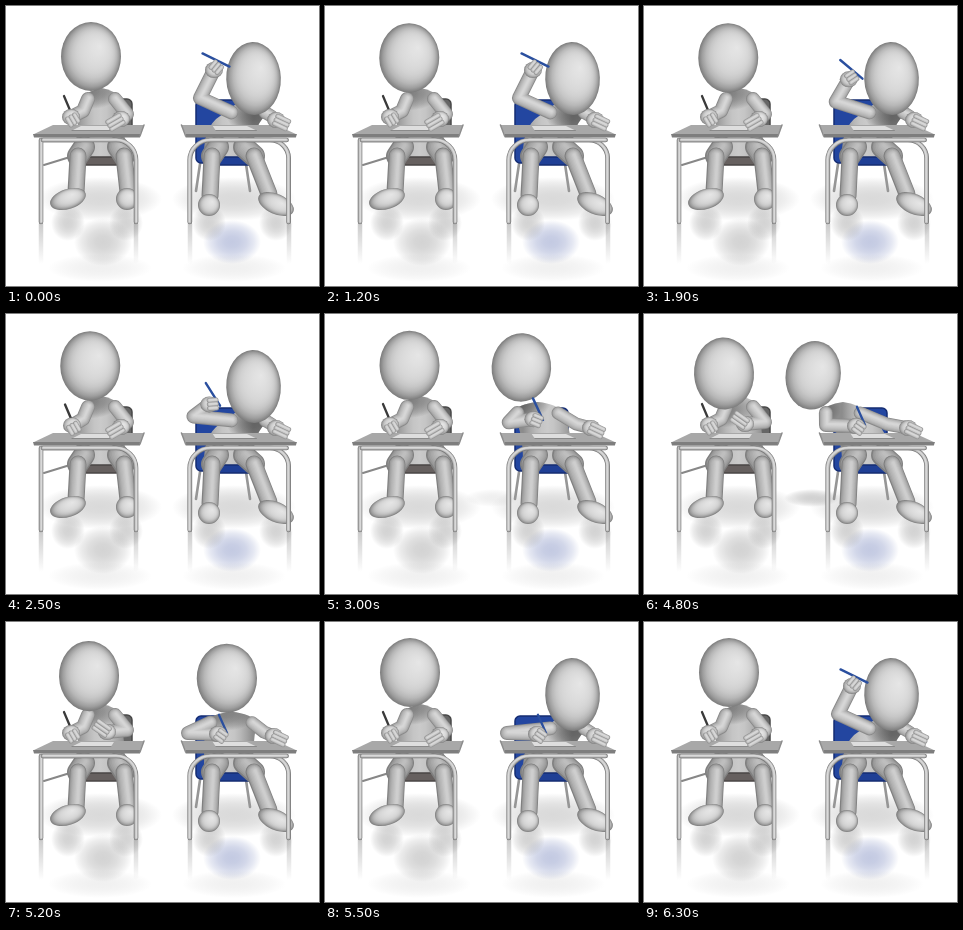
An HTML page with a canvas that plays this animation: 313x280 px, repeating every 6400 ms.

```html
<!DOCTYPE html>
<html lang="en">
<head>
<meta charset="utf-8">
<title>Two students at their desks</title>
<style>
html, body { margin: 0; width: 100%; height: 100%; overflow: hidden; background: #fff; }
canvas { display: block; width: 313px; height: 280px; }
</style>
</head>
<body>
<canvas id="stage"></canvas>
<script>
const W = 313, H = 280, LOOP = 6400, STEP = 100;
const canvas = document.getElementById('stage');
const ctx = canvas.getContext('2d');
const ratio = window.devicePixelRatio || 1;
canvas.width = W * ratio;
canvas.height = H * ratio;

const { sin, cos, PI, abs, sqrt } = Math;
const rad = deg => deg * PI / 180;
const mix = (a, b, u) => a + (b - a) * u;
const grey = v => `rgb(${v | 0},${v | 0},${v | 0})`;

// Eased 0 to 1 between two times
function ramp(t, from, to) {
  const u = Math.min(1, Math.max(0, (t - from) / (to - from)));
  return u * u * (3 - 2 * u);
}

// Short writing strokes inside a time window
const scribble = (t, from, to) => t > from && t < to ? sin(t / 200 * PI) : 0;

// ---- drawing helpers ----
function tube(pts, w, lo = 138, hi = 214, bend = 0) {
  const layers = w > 8 ? 8 : 4;
  for (let i = 0; i < layers; i++) {
    const u = i / (layers - 1), o = w * 0.08 * u;
    const at = k => [pts[k][0] + o, pts[k][1] - o];
    const last = pts.length - 1;
    ctx.beginPath();
    ctx.moveTo(...at(0));
    for (let k = 1; k < last; k++) ctx.arcTo(...at(k), ...at(k + 1), bend);
    ctx.lineTo(...at(last));
    ctx.lineWidth = w * (1 - 0.85 * u);
    ctx.strokeStyle = grey(mix(lo, hi, sqrt(u)));
    ctx.stroke();
  }
}

function line(x0, y0, x1, y1, w, color) {
  ctx.beginPath();
  ctx.moveTo(x0, y0);
  ctx.lineTo(x1, y1);
  ctx.lineWidth = w;
  ctx.strokeStyle = color;
  ctx.stroke();
}

// Slab seen from the front: back edge x0..x1, front edge x2..x3
function slab(x0, x1, x2, x3, top, bottom, fill) {
  ctx.beginPath();
  ctx.moveTo(x0, top);
  ctx.lineTo(x1, top);
  ctx.lineTo(x3, bottom);
  ctx.lineTo(x2, bottom);
  ctx.fillStyle = fill;
  ctx.fill();
}

function oval(x, y, rx, ry, deg, paint) {
  ctx.save();
  ctx.translate(x, y);
  ctx.rotate(rad(deg));
  ctx.scale(rx, ry);
  ctx.beginPath();
  ctx.arc(0, 0, 1, 0, 2 * PI);
  ctx.fillStyle = paint;
  ctx.fill();
  ctx.restore();
}

// Soft sphere shading, lit from the upper right
const skin = ctx.createRadialGradient(0.3, -0.3, 0, 0, 0, 1);
for (let u = 0; u <= 1; u += 0.1) skin.addColorStop(u, grey(230 - 24 * u - 84 * u ** 5));
const ball = (x, y, rx, ry, deg = 0) => oval(x, y, rx, ry, deg, skin);

function blob(x, y, rx, ry, alpha, rgb = '110,110,110') {
  const g = ctx.createRadialGradient(0, 0, 0, 0, 0, 1);
  for (let u = 0; u <= 1; u += 0.25) g.addColorStop(u, `rgba(${rgb},${alpha * (1 - u * u)})`);
  oval(x, y, rx, ry, 0, g);
}

function pad(x, y, w, h, fill, edge) {
  ctx.beginPath();
  ctx.roundRect(x, y, w, h, 5);
  ctx.fillStyle = fill;
  ctx.fill();
  ctx.lineWidth = 1.5;
  ctx.strokeStyle = edge;
  ctx.stroke();
}

// ---- figure ----
function torso([ax, ay], [bx, by], x0, x1, head) {
  const mid = (ax + bx) / 2, base = 147;
  const g = ctx.createLinearGradient(x0, 0, x1, 0);
  for (let u = 0; u <= 1; u += 0.125) g.addColorStop(u, grey(140 + 62 * sin(PI * u)));
  ctx.save();
  ctx.beginPath();
  ctx.moveTo(ax - 5, ay);
  ctx.quadraticCurveTo(ax, ay - 9, mid, ay - 11);
  ctx.quadraticCurveTo(bx, by - 9, bx + 5, by);
  ctx.quadraticCurveTo(x1, 116, x1, base);
  ctx.quadraticCurveTo((x0 + x1) / 2, base + 11, x0, base);
  ctx.quadraticCurveTo(x0, 116, ax - 5, ay);
  ctx.fillStyle = g;
  ctx.fill();
  ctx.clip();
  blob(head.x, head.y + head.ry, head.rx, 18, 0.5, '60,60,60');
  ctx.restore();
}

function hand([x, y], deg, reach) {
  ball(x, y, 9, 8);
  const c = cos(rad(deg)), s = sin(rad(deg));
  for (const k of [-4, 0, 4]) {
    const px = x - s * k, py = y + c * k;
    tube([[px, py], [px + c * reach, py + s * reach]], 5, 150, 222);
  }
}

function leg(hip, knee, ankle) {
  tube([hip, knee], 22, 128, 190);
  tube([knee, ankle], 17, 128, 206);
}

// Pen given by its middle, slope and half length
function pen(x, y, deg, half, color) {
  const dx = cos(rad(deg)) * half, dy = sin(rad(deg)) * half;
  line(x - dx, y - dy, x + dx, y + dy, 2.4, color);
}

const drawHead = h => ball(h.x, h.y, h.rx, h.ry, h.tilt);

// ---- furniture and floor ----
function desk(bend) {
  tube([[75, 134], [35, 134], [35, 216]], 4.6, 120, 226, bend);
  tube([[37, 134], [130, 134], [130, 216]], 4.6, 120, 226, 20);
  slab(47, 138, 27, 134, 119, 128.5, grey(168));
  slab(27, 134, 28, 134, 128, 131.5, grey(126));
  line(138, 119, 134, 130, 1.5, grey(140));
  slab(75, 108, 66, 105, 120, 124.5, grey(222));
  line(66, 124.5, 105, 124.5, 0.8, grey(125));
}

// The right desk mirrors the left one, slightly wider
function rightDesk() {
  ctx.save();
  ctx.translate(319, 0);
  ctx.scale(-1.04, 1);
  desk(18);
  ctx.restore();
}

function floor(lean) {
  for (const x of [94, 228]) {
    blob(x, 193, 62, 22, 0.26);
    blob(x, 262, 52, 14, 0.1);
  }
  blob(97, 236, 29, 24, 0.3);
  blob(226, 236, 29, 22, 0.36, '90,108,175');
  for (const x of [62, 120, 203, 270]) blob(x, 217, 17, 18, 0.3);
  if (lean < 0) blob(168, 184, 28, 9, -lean / 110);
  const fade = ctx.createLinearGradient(0, 216, 0, 258);
  fade.addColorStop(0, 'rgba(120,120,120,.4)');
  fade.addColorStop(1, 'rgba(120,120,120,0)');
  for (const x of [35, 130, 184, 283]) line(x, 218, x, 256, 4.5, fade);
}

// ---- students ----
function leftStudent(t) {
  const bow = 0.15 * (ramp(t, 0, 700) - ramp(t, 2800, 3300))
    + ramp(t, 3300, 3800) - ramp(t, 4800, 5500);
  const lift = ramp(t, 3300, 3800) - ramp(t, 5200, 5500);
  const stroke = scribble(t, 0, 1400) + scribble(t, 2200, 3600);
  const head = { x: 85 - 5 * bow, y: 50.5 + 9 * bow, rx: 30, ry: 34.5 + 1.5 * bow, tilt: -3 * bow };
  const a = [82, 93], b = [109, 93];
  const handA = [65 + stroke, 111 + stroke * 0.4];
  const handB = [mix(115, 101, lift), mix(113, 110, lift)];

  line(38, 159, 64, 151, 2, grey(135));
  pad(96, 93, 30, 36, '#666', '#484848');
  torso(a, b, 70, 119, head);
  pad(75, 151, 44, 8, '#66605f', '#4a4646');
  leg([78, 141], [72, 150], [70, 186]);
  leg([112, 141], [118, 150], [122, 186]);
  ball(62, 193, 18.5, 10, -18);
  ball(121, 193, 11, 11);
  desk(0);
  tube([b, [121, 108], handB], 14);
  hand(handB, mix(150, 215, lift), 13);
  tube([a, [77, 105], handA], 14);
  pen(handA[0] - 1.5, handA[1] - 8, 67, 14, '#3a3a3a');
  hand(handA, 60, 7);
  drawHead(head);
}

// lean: degrees of the head about the waist, raise: 1 with the pen at the head
function rightStudent(t, lean) {
  const raise = 1 - 0.55 * ramp(t, 1500, 2500) - 0.45 * ramp(t, 2500, 3300) + ramp(t, 5900, 6300);
  const tap = scribble(t, 0, 1600);
  const radius = 67 - lean * 0.17, side = abs(lean) / 36;
  const head = {
    x: 211 + radius * sin(rad(lean)),
    y: 121 - radius * cos(rad(lean)),
    rx: 31 - 3.6 * side, ry: 34 + side * (lean > 0 ? 2.4 : 0.5), tilt: lean < 0 ? -lean / 4 : -lean / 18
  };
  const cx = 220 + lean * 0.6, cy = 99 + Math.max(0, lean) * 0.2, half = 22 - 5 * side;
  const a = [cx - half, cy], b = [cx + half, cy];
  const elbowA = [mix(182, 194, raise), mix(111, 92, raise)];
  const handA = [212 - 4 * raise - 7 * sin(PI * raise), mix(112, 64, raise) + tap];
  const handB = [267 + lean / 12, 114];

  for (const d of [-1, 1]) line(217 + d * 23, 158, 217 + d * 27, 185, 2.6, grey(150));
  pad(190, 94, 53, 63, '#2346a0', '#142c72');
  torso(a, b, 198, 247, head);
  pad(198, 151, 49, 8, '#1f3f95', '#142c72');
  leg([212, 141], [206, 150], [204, 190]);
  leg([238, 141], [248, 150], [263, 188]);
  ball(203, 199, 11, 11);
  ball(270, 198, 19, 10, 24);
  rightDesk();
  tube([b, [mix(b[0], handB[0], 0.55), 110], handB], 13);
  hand(handB, 25, 12);
  tube([a, elbowA, handA], 14);
  drawHead(head);
  pen(handA[0] + 5 - 3 * raise, handA[1] - 10, 66 - 40 * raise * raise, 10 + 5 * sqrt(abs(raise)), '#2a4f9f');
  hand(handA, mix(35, -50, raise), 7);
}

function draw(t) {
  const lean = 37 - 72 * ramp(t, 2500, 3300) + 72 * ramp(t, 4800, 5500);
  ctx.setTransform(ratio, 0, 0, ratio, 0, 0);
  ctx.fillStyle = '#fff';
  ctx.fillRect(0, 0, W, H);
  ctx.lineCap = ctx.lineJoin = 'round';
  floor(lean);
  leftStudent(t);
  rightStudent(t, lean);
}

function tick(now) {
  draw(Math.floor(now % LOOP / STEP) * STEP);
  requestAnimationFrame(tick);
}
draw(0);
requestAnimationFrame(tick);
</script>
</body>
</html>
```
